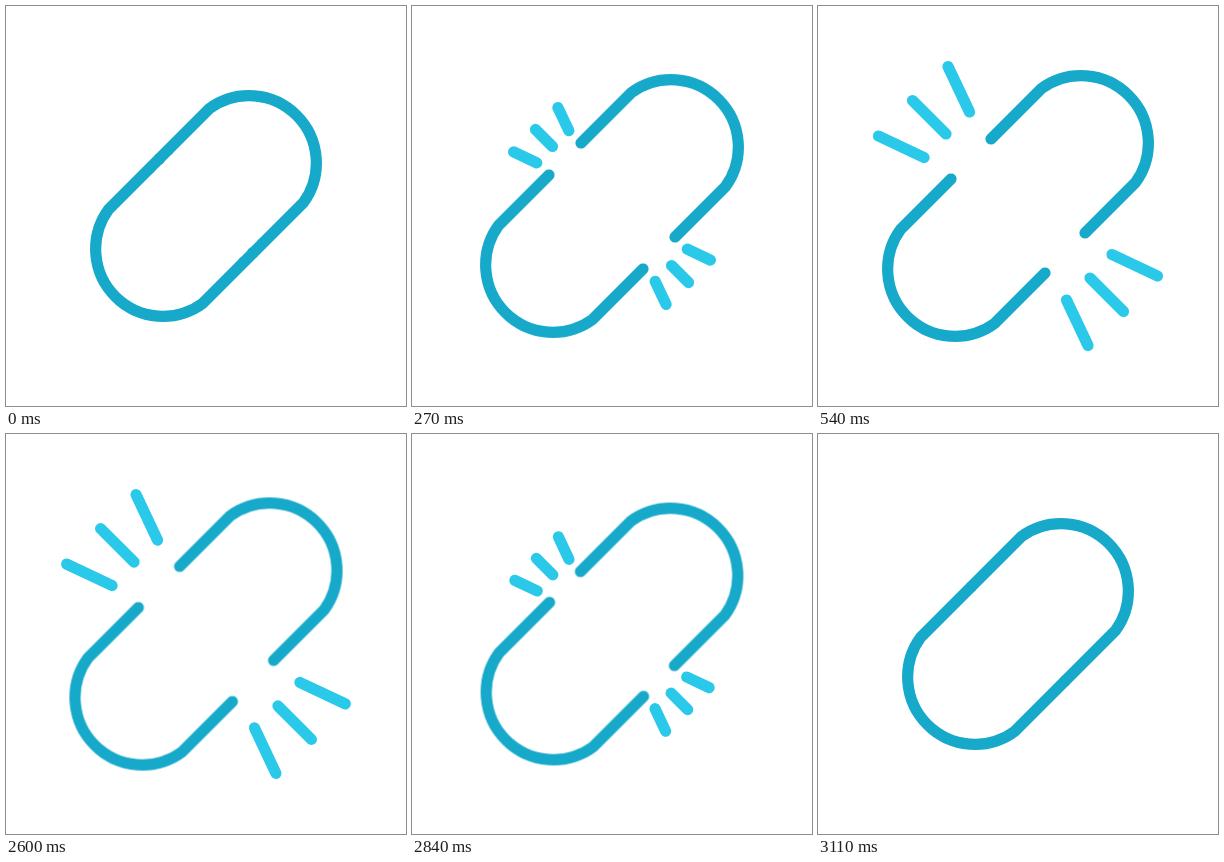
Animation of 400x400 px, one loop 4140 ms. Source, as an HTML page:

```html
<!DOCTYPE html>
<html lang="en">
<head>
<meta charset="utf-8">
<title>Breaking link</title>
<style>
  html, body {
    margin: 0;
    width: 100%;
    height: 100%;
    overflow: hidden;
    background: #fff;
  }
  svg {
    display: block;
    width: 100%;
    height: 100%;
  }
  path {
    fill: none;
    stroke-width: 11.2px;
    stroke-linecap: round;
    stroke-linejoin: round;
  }
  .ray {
    stroke: #2bc9e9;
    d: var(--from);
    animation: burst 4140ms cubic-bezier(.75, 0, .25, 1) infinite;
  }
  .left {
    --from: path("M144 162.3L144 162.3");
    --to: path("M106 151.5L60.5 130");
  }
  .mid {
    --from: path("M153.3 153.3L153.3 153.3");
    --to: path("M128 128L94.5 94.5");
  }
  .right {
    --from: path("M162.3 144L162.3 144");
    --to: path("M151.5 106L130 60.5");
  }
  .half {
    stroke: #16a9c9;
    animation: split 4140ms ease-in-out infinite;
  }

  /* opens over 0-540 ms, closes in mirror image over 2570-3110 ms */
  @keyframes burst {
    0%, 75.1208%, 100% { d: var(--from); visibility: hidden; }
    13.0435%, 62.0773% { d: var(--to); visibility: visible; }
  }
  @keyframes split {
    0%, 4.2271% { transform: translate(0, 0); }
    8.6957% { transform: translate(30px, -30px); }
    13.0435%, 62.0773% { transform: translate(20px, -20px); }
    66.4251% { transform: translate(30px, -30px); }
    70.8937%, 100% { transform: translate(0, 0); }
  }
</style>
</head>
<body>
<svg viewBox="0 0 400 400">
  <g>
    <path class="ray left"/>
    <path class="ray mid"/>
    <path class="ray right"/>
  </g>
  <g transform="rotate(180 200 200)">
    <path class="ray left"/>
    <path class="ray mid"/>
    <path class="ray right"/>
  </g>
  <path class="half" d="M153 153L203.5 102.5A67.3 67.3 0 0 1 297.5 196.5L247 247"/>
  <g transform="rotate(180 200 200)">
    <path class="half" d="M153 153L203.5 102.5A67.3 67.3 0 0 1 297.5 196.5L247 247"/>
  </g>
</svg>
</body>
</html>
```
